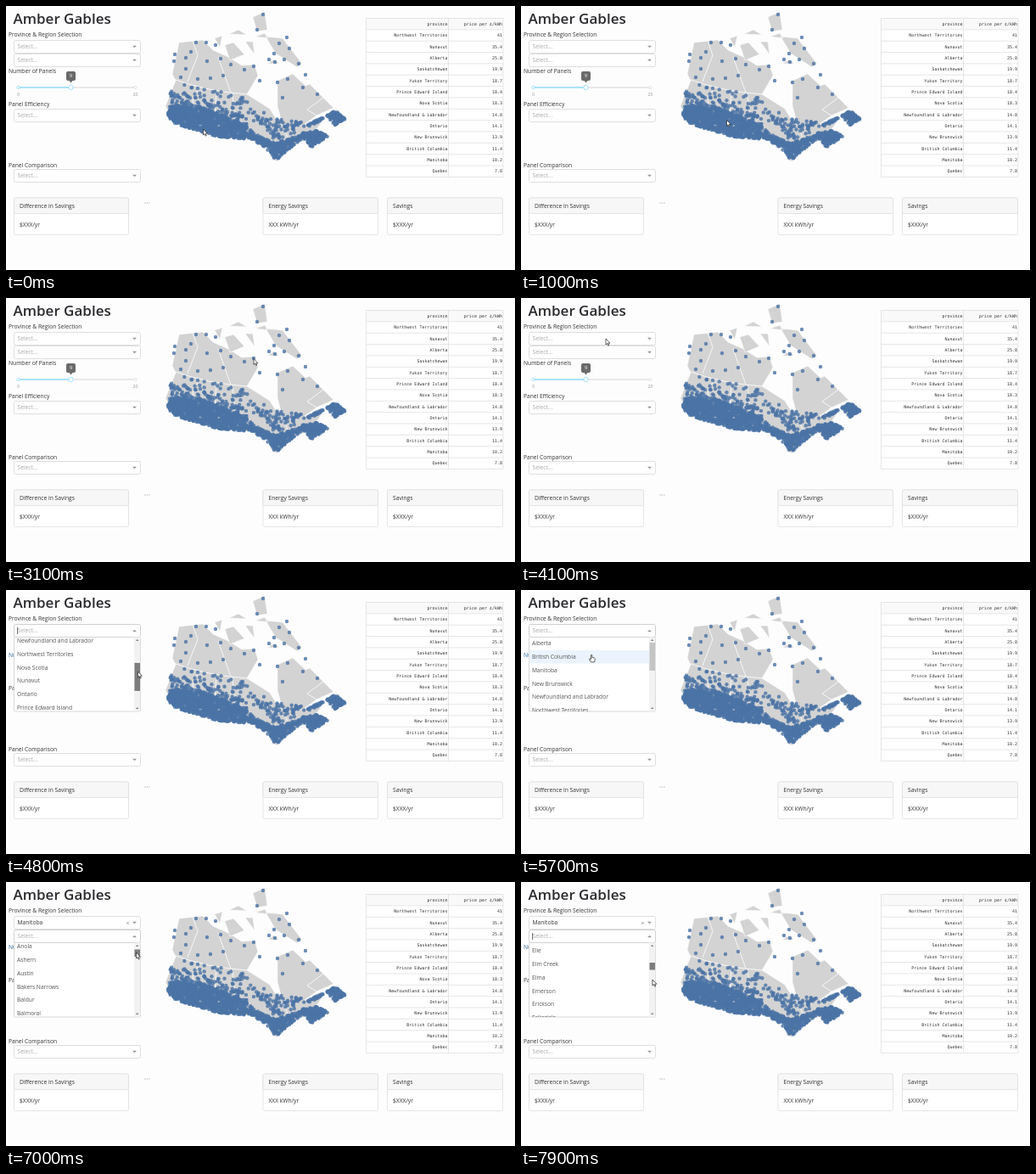
Recreate the animation shown at these times as an HTML page with a canvas. Size 600 by 311 pixels, loop 8 s.

```html
<!DOCTYPE html>
<html lang="en">
<head>
<meta charset="utf-8">
<title>Amber Gables</title>
<style>
html, body { margin: 0; width: 100%; height: 100%; overflow: hidden; background: #fdfdfe; }
canvas { display: block; width: 600px; height: 311px; }
</style>
</head>
<body>
<canvas id="stage"></canvas>
<script>
const W = 600, H = 311, LOOP = 8000, ROW = 15.7;
const SANS = '"Open Sans", "Noto Sans", sans-serif';
const MONO = '"DejaVu Sans Mono", monospace';
const dpr = window.devicePixelRatio || 1;

function setup(canvas) {
  canvas.width = W * dpr;
  canvas.height = H * dpr;
  const c = canvas.getContext('2d');
  c.scale(dpr, dpr);
  return c;
}
const g = setup(document.getElementById('stage'));
const base = document.createElement('canvas');
const b = setup(base);

function text(c, str, x, y, size = 6.7, color = '#333', align = 'left', font = SANS, weight = 400) {
  c.font = `${weight} ${size}px ${font}`;
  c.fillStyle = color;
  c.textAlign = align;
  c.textBaseline = 'alphabetic';
  c.fillText(str, x, y + size * 0.36);
}

function box(c, x, y, w, h, fill, stroke, r = 2) {
  c.beginPath();
  c.roundRect(x + 0.5, y + 0.5, w - 1, h - 1, r);
  if (fill) { c.fillStyle = fill; c.fill(); }
  if (stroke) { c.strokeStyle = stroke; c.lineWidth = 0.8; c.stroke(); }
}

function shape(c, d, fill, stroke, width = 0.7) {
  const p = new Path2D(d);
  if (fill) { c.fillStyle = fill; c.fill(p); }
  if (stroke) { c.strokeStyle = stroke; c.lineWidth = width; c.stroke(p); }
}

function arrow(c, x, y, up, size = 2.5, color = '#999') {
  const s = up ? -1 : 1;
  shape(c, `M${x - size} ${y - s * size / 2}h${2 * size}l${-size} ${s * size}Z`, color);
}

// Map
const MAINLAND = 'M204 43L232 40 244 52 262 60 278 70 293 69 297 82 284 104 311 121 320 136 324 133 ' +
  '320 118 320 88 338 80 353 94 358 92 386 120 366 129 352 139 372 137 364 148 358 158 345 160 ' +
  '328 170 320 183 313 181 316 172 292 157 250 154 197 137 188 118 200 88 196 80Z';
const ISLANDS = 'M377 128L389 122 401 132 388 142ZM306 36L326 38 349 68 343 72 318 56Z' +
  'M308 68L316 63 322 68ZM258 46L268 43 281 57 264 64ZM291 13L305 7 308 28 296 30Z' +
  'M263 33L274 28 284 34ZM294 36L305 32 309 38ZM282 42L291 42 293 57ZM246 38L255 35 252 49Z';
const BORDERS = 'M220 41L226 58 214 89M197 86Q238 101 285 104M228 95L220 112 232 149' +
  'M248 100L245 152M267 103L272 157M250 60L265 102M323 134L336 164M374 108L355 122 366 129';

const ZONES = [
  ['M192 118L235 120 284 141 292 150 290 157 250 154 200 139 190 130Z', 850],
  ['M190 95L232 110 284 132 286 145 200 128Z', 150],
  ['M196 88L284 108 318 135 320 150 250 125Z', 60],
  ['M290 149L316 161 345 153 357 150 334 168 318 182 312 172 290 157Z', 260],
  ['M346 150L366 147 380 153 360 167Z', 150],
  ['M378 129L388 123 400 133 388 141Z', 95],
  ['M350 142L384 126 360 142Z', 28],
  ['M292 130L350 136 345 150 316 157Z', 70]
];
const NORTH = [
  303,10, 296,28, 331,37, 322,44, 334,50, 345,68, 316,56, 310,63, 317,66, 328,63, 353,81,
  320,90, 332,86, 350,96, 292,71, 299,88, 281,75, 265,69, 253,62, 247,46, 236,43, 224,43,
  218,54, 212,61, 199,57, 198,65, 237,65, 241,85, 256,82, 226,86, 212,74, 206,84, 367,104, 326,108
];

function seeded(seed) {
  return () => (seed = (seed * 16807) % 2147483647) / 2147483647;
}

function dot(x, y) {
  b.beginPath();
  b.arc(x, y, 2.2, 0, 7);
  b.fill();
}

function drawMap() {
  for (const d of [MAINLAND, ISLANDS]) shape(b, d, '#d3d3d3', '#fff', 0.5);
  shape(b, BORDERS, null, '#fff', 0.8);
  const rnd = seeded(4211);
  const probe = document.createElement('canvas').getContext('2d');
  probe.canvas.width = W;
  probe.canvas.height = H;
  b.fillStyle = 'rgba(76,116,166,.82)';
  for (let i = 0; i < NORTH.length; i += 2) dot(NORTH[i], NORTH[i + 1]);
  for (const [d, count] of ZONES) {
    const zone = new Path2D(d);
    for (let n = 0; n < count;) {
      const x = 185 + rnd() * 220, y = 85 + rnd() * 100;
      if (probe.isPointInPath(zone, x, y)) { dot(x, y); n++; }
    }
  }
}

// Fixed page parts
const PRICES = [
  ['Northwest Territories', '41'], ['Nunavut', '35.4'], ['Alberta', '25.8'],
  ['Saskatchewan', '19.9'], ['Yukon Territory', '18.7'], ['Prince Edward Island', '18.4'],
  ['Nova Scotia', '18.3'], ['Newfoundland & Labrador', '14.8'], ['Ontario', '14.1'],
  ['New Brunswick', '13.9'], ['British Columbia', '11.4'], ['Manitoba', '10.2'], ['Quebec', '7.8']
];

function drawTable() {
  const x = 424.5, y = 14.5, w = 161.5, rh = 13.35;
  b.fillStyle = '#fff';
  b.fillRect(x, y, w, rh * 14);
  b.fillStyle = '#f9f9fa';
  b.fillRect(x, y, w, rh);
  b.strokeStyle = '#dcdcdc';
  b.lineWidth = 0.7;
  b.beginPath();
  for (let i = 0; i <= 14; i++) { b.moveTo(x, y + i * rh); b.lineTo(x + w, y + i * rh); }
  for (const vx of [x, 521.5, x + w]) { b.moveTo(vx, y); b.lineTo(vx, y + 14 * rh); }
  b.stroke();
  [['province', 'price per ¢/kWh'], ...PRICES].forEach(([name, price], i) => {
    const ty = 21 + i * rh;
    text(b, name, 520.5, ty, 5, '#333', 'right', MONO);
    text(b, price, 585, ty, 5, '#333', 'right', MONO);
  });
}

function card(x, w, title, body) {
  box(b, x, 225.5, w, 44.5, '#fff', '#dfdfdf');
  box(b, x, 225.5, w, 19.5, '#f7f7f7', '#dfdfdf');
  text(b, title, x + 7, 236);
  text(b, body, x + 7, 257.5);
}

function select(c, y, opt = {}) {
  box(c, 9, y, 150, 16, '#fff', opt.open ? '#c4c4c4' : '#d6d6d6');
  text(c, opt.value || 'Select...', 13.5, y + 8, 6.7, opt.value ? '#333' : '#aaa');
  if (opt.value) text(c, '×', 143.5, y + 8, 7, '#888', 'center');
  if (opt.caret) { c.fillStyle = '#333'; c.fillRect(13, y + 4, 0.7, 8); }
  arrow(c, 151.5, y + 8, opt.open);
}

function drawSlider() {
  b.fillStyle = '#e9e9e9';
  b.fillRect(14, 95, 139, 2);
  b.fillStyle = '#abe2fb';
  b.fillRect(14, 95, 62.5, 2);
  for (const x of [14.5, 152.5, 76.5]) {
    b.beginPath();
    b.arc(x, 96, x === 76.5 ? 2.7 : 1.6, 0, 7);
    b.fillStyle = '#fff';
    b.fill();
    b.strokeStyle = x === 152.5 ? '#e0e0e0' : '#96dbfa';
    b.lineWidth = 0.9;
    b.stroke();
  }
  box(b, 70.5, 76.5, 12, 12, '#6a6a6a', null);
  shape(b, 'M74.5 88h4l-2 2.5Z', '#6a6a6a');
  text(b, '9', 76.5, 82.3, 5.5, '#fff', 'center');
  text(b, '0', 14.5, 104, 5.3, '#999', 'center');
  text(b, '20', 152.5, 104, 5.3, '#999', 'center');
}

function drawBase() {
  b.fillStyle = '#fdfdfe';
  b.fillRect(0, 0, W, H);
  text(b, 'Amber Gables', 8.5, 15, 17, '#2a2a2e', 'left', SANS, 600);
  text(b, 'Province & Region Selection', 3, 34);
  text(b, 'Number of Panels', 3, 77);
  text(b, 'Panel Efficiency', 3, 116);
  text(b, 'Panel Comparison', 3, 187.5);
  select(b, 121);
  select(b, 192);
  drawSlider();
  drawTable();
  card(9, 136, 'Difference in Savings', '$XXX/yr');
  card(302.5, 136.5, 'Energy Savings', 'XXX kWh/yr');
  card(449, 137, 'Savings', '$XXX/yr');
  b.fillStyle = '#aaa';
  for (let i = 0; i < 3; i++) b.fillRect(163.5 + i * 2.4, 231.5, 1.1, 1.1);
  drawMap();
}

// Menus
const PROVINCES = ['Alberta', 'British Columbia', 'Manitoba', 'New Brunswick', 'Newfoundland and Labrador',
  'Northwest Territories', 'Nova Scotia', 'Nunavut', 'Ontario', 'Prince Edward Island', 'Quebec',
  'Saskatchewan', 'Yukon'];
const TOWNS = ('Alexander,Alonsa,Altamont,Altona,Amaranth,Angusville,Anola,Ashern,Austin,Bakers Narrows,Baldur,' +
  'Balmoral,Barrows,Beausejour,Belmont,Benito,Berens River,Binscarth,Birch River,Birtle,Blumenort,Boissevain,' +
  'Bowsman,Brandon,Brochet,Brookdale,Brunkild,Camperville,Carberry,Carman,Cartwright,Churchill,Clandeboye,' +
  'Clearwater,Cormorant,Crandall,Cross Lake,Crystal City,Cypress River,Darlingford,Dauphin,Deloraine,' +
  'Dominion City,Douglas,Duck Bay,Dugald,Dunrea,East Selkirk,Easterville,Elgin,Elie,Elm Creek,Elma,Emerson,' +
  'Erickson,Eriksdale,Ethelbert,Falcon Lake,Fannystelle').split(',');

function menu(top, items, scroll, focus, thumbY, thumbH, dragging) {
  const h = 88.5;
  box(g, 9, top, 150, h, '#fff', '#cfcfcf', 1);
  g.save();
  g.beginPath();
  g.rect(9.5, top + 0.5, 149, h - 1);
  g.clip();
  items.forEach((name, i) => {
    const y = top + 8 + i * ROW - scroll;
    if (y < top - ROW || y > top + h + ROW) return;
    if (i === focus) {
      g.fillStyle = '#ebf4fe';
      g.fillRect(9.5, y - ROW / 2, 141.5, ROW);
    }
    text(g, name, 13, y, 6.7, '#555');
  });
  g.fillStyle = '#f2f2f2';
  g.fillRect(151, top, 7.5, h);
  g.fillStyle = dragging ? '#7d7d7d' : '#c4c4c4';
  g.fillRect(151.5, thumbY, 6.5, thumbH);
  arrow(g, 154.7, top + 4, true, 1.7, '#555');
  arrow(g, 154.7, top + h - 4, false, 1.7, '#555');
  g.restore();
}

// Piecewise motion: keys are [time, ...values]
function at(t, keys) {
  let i = 0;
  while (i < keys.length - 2 && t >= keys[i + 1][0]) i++;
  const [p, q] = [keys[i], keys[i + 1]];
  const k = Math.min(1, Math.max(0, (t - p[0]) / (q[0] - p[0])));
  const e = k * k * (3 - 2 * k);
  return p.slice(1).map((v, n) => v + (q[n + 1] - v) * e);
}

const PATH = [
  [0, 232.5, 145], [900, 242, 134], [1700, 253, 142], [2200, 253, 142], [3000, 292, 72], [3300, 292, 70],
  [4100, 100, 48], [4250, 100, 48], [4500, 154.5, 72], [4800, 155.5, 96], [5050, 155.5, 114],
  [5200, 155.5, 114], [5450, 154, 72], [5700, 82.5, 76.5], [6000, 72, 92], [6400, 110, 62],
  [6800, 153.5, 80], [7000, 153.5, 83], [7900, 155, 115]
];
const SCROLL = [[4500, 0], [4800, 66], [5050, 116], [5200, 116], [5450, 0]];
const SCROLL_TOWNS = [[6800, 0], [7000, 6 * ROW + 3], [7900, TOWNS.indexOf('Elie') * ROW - 2]];
const THUMB_TOWNS = [[6800, 78.5], [7000, 79.5], [7900, 95]];

function cursor(x, y, hand) {
  g.save();
  g.translate(x, y);
  if (hand) {
    shape(g, 'M0 0Q1-.7 1.4.3V3L4 3.5Q5 4 4.8 5L4 8.4H0L-2 5.4Q-2 4-1 4.6L0 5.4Z', '#fff', '#222');
  } else {
    shape(g, 'M0 0V7L1.6 5.6 2.7 8.1 3.8 7.6 2.7 5.2H4.9Z', '#fff', '#222');
  }
  g.restore();
}

function tooltip(x, y) {
  g.save();
  g.shadowColor = 'rgba(0,0,0,.2)';
  g.shadowBlur = 3;
  box(g, x, y, 31, 15, '#fff', null, 1.5);
  g.restore();
  box(g, x, y, 31, 15, null, '#d8d8d8', 1.5);
  text(g, 'Sun Valley', x + 3.5, y + 7.3, 4.7, '#222');
}

function draw(t) {
  const [x, y] = at(t, PATH);
  const first = t >= 4200 && t < 6100;
  const second = t >= 6500;
  const blink = start => ((t - start) % 1060 + 1060) % 1060 < 530;

  g.drawImage(base, 0, 0, W, H);
  select(g, 40, {
    open: first,
    value: t >= 6100 ? 'Manitoba' : '',
    caret: first && blink(4700)
  });
  select(g, 56, { open: second, caret: second && blink(6390) });
  if (first || second) {
    g.fillStyle = '#fdfdfe';
    g.fillRect(2, 72, 7, 10);
    g.save();
    g.beginPath();
    g.rect(2, 72, 7, 10);
    g.clip();
    text(g, 'Number of Panels', 3, 77, 6.7, '#2f6699');
    g.restore();
  }
  if (first) {
    const [s] = at(t, SCROLL);
    const over = t > 5450 && x < 150;
    const focus = over ? Math.floor((y - 55) / ROW) : 0;
    menu(55, PROVINCES, s, focus, 62 + s * 0.362, 33, t >= 4500 && t < 5450);
  }
  if (second) {
    menu(71, TOWNS, at(t, SCROLL_TOWNS)[0], 0, at(t, THUMB_TOWNS)[0], 8.5, t >= 6800);
  }
  if (t >= 1600 && t < 2300) tooltip(x + 4, y + 4);
  cursor(x, y, t > 5500 && t < 6150 && x < 150);
}

drawBase();
function tick() {
  const t = performance.now() % LOOP;
  draw(Math.floor(t / 100) * 100);
  requestAnimationFrame(tick);
}
tick();
</script>
</body>
</html>
```
